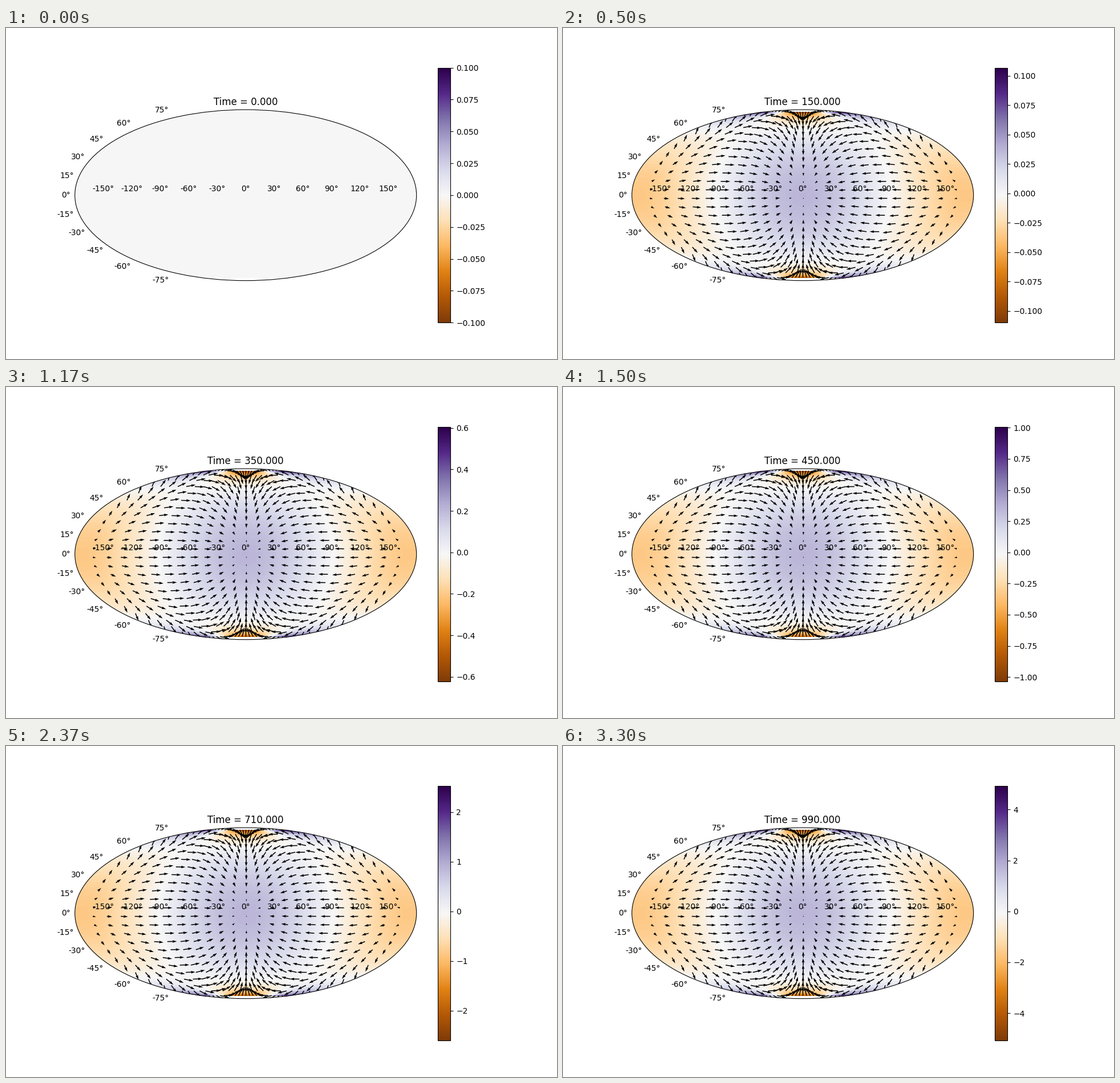
Animation, 966 px wide and 580 px high, one loop 3330 ms. Source, as a matplotlib script:

```python
import numpy as np
import matplotlib.pyplot as plt
from matplotlib.animation import FuncAnimation

FRAMES = 100
LOOP_MS = 3330
DT = 10.0
GROWTH = 5.09e-6          # upper colour limit per unit of t * (t - DT)
LON_LIMIT = np.radians(166.4)   # the field stays level beyond this longitude
SKEW = -1 / np.cos(LON_LIMIT)   # lower limit relative to the upper one
PEAK = 9.0                # size of the raw pattern at the polar edge

fig = plt.figure(figsize=(9.66, 5.8), dpi=100)
ax = fig.add_subplot(projection="mollweide")

# Height pattern: high at the centre, reversed and steep near the poles
lon_edges = np.radians(np.linspace(-180, 180, 101))
lat_edges = np.radians(np.linspace(-83.8, 83.8, 93))
lon = (lon_edges[:-1] + lon_edges[1:]) / 2
lat = (lat_edges[:-1] + lat_edges[1:]) / 2
cos_lat = np.cos(lat)[:, None]
cos_lon = np.cos(np.clip(lon, -LON_LIMIT, LON_LIMIT))
pattern = cos_lon * (4 * cos_lat - 1 / cos_lat) / PEAK

mesh = ax.pcolormesh(lon_edges, lat_edges, np.zeros_like(pattern),
                     cmap="PuOr", vmin=-0.1, vmax=0.1)
fig.colorbar(mesh, ax=ax)

# Flow towards the centre of the map
q_lon, q_lat = np.meshgrid(np.radians(0.8 + 14.72 * np.arange(-11, 12)),
                           np.radians(-82.73 + 7.273 * np.arange(24)))
arrows = ax.quiver(q_lon, q_lat, -np.sin(q_lon),
                   -np.sin(q_lat) * np.cos(q_lon))
title = ax.set_title("Time = 0.000")


def update(i):
    t = i * DT
    top = GROWTH * t * (t - DT)
    bottom = SKEW * top
    mesh.set_array(pattern * bottom)
    if top > 0:
        mesh.set_clim(-bottom, top)
    else:
        mesh.set_clim(-0.1, 0.1)
    arrows.set_visible(i > 0)
    title.set_text(f"Time = {t:.3f}")
    return mesh, arrows, title


anim = FuncAnimation(fig, update, frames=FRAMES, interval=LOOP_MS / FRAMES,
                     init_func=lambda: update(0), repeat=True,
                     repeat_delay=0, blit=False)
plt.show()
```
